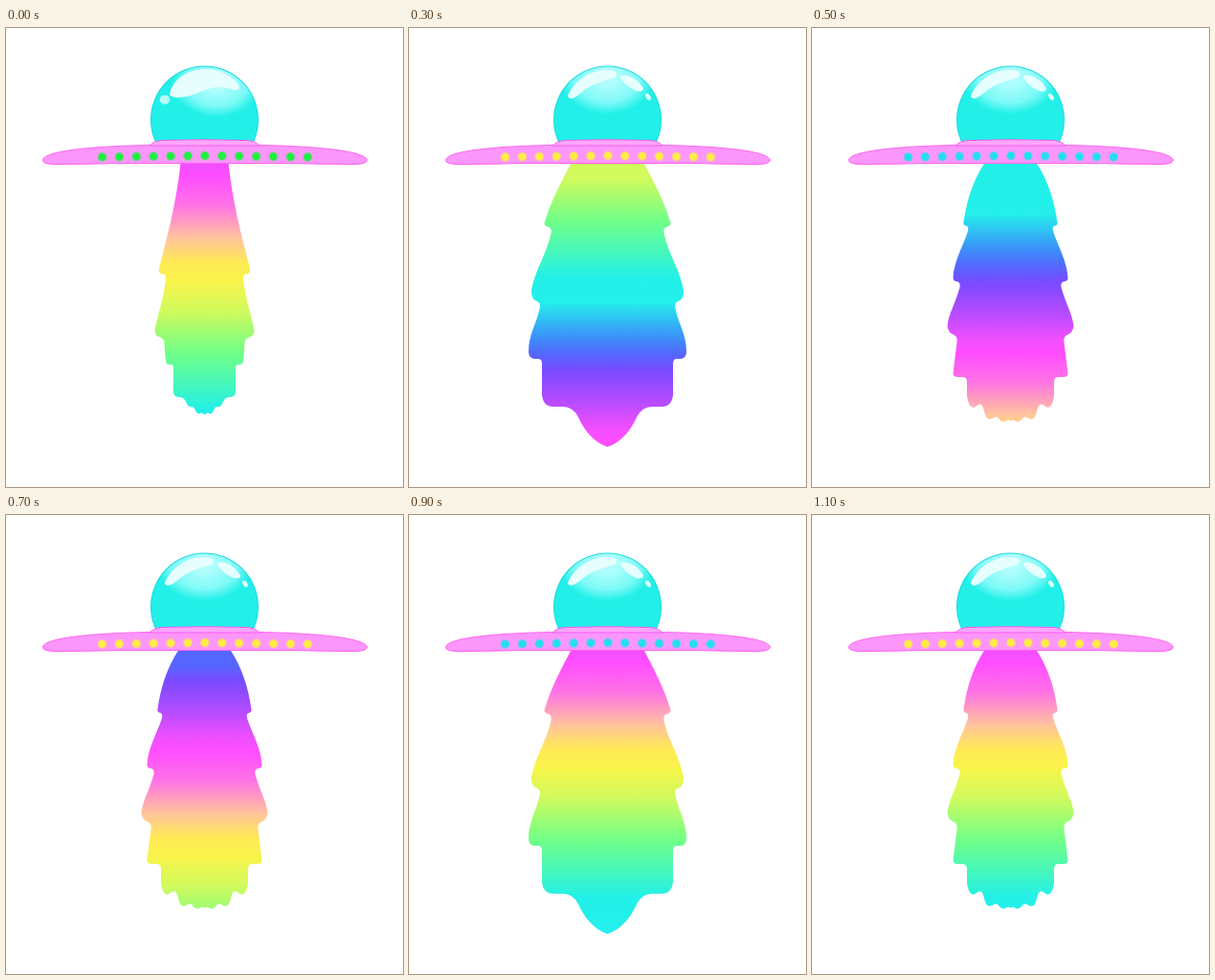
Write an HTML page with a canvas that moves like this. It is 415 px wide and 480 px high and loops after 1.2 s.

```html
<!DOCTYPE html>
<html>
<head>
<meta charset="utf-8">
<style>
html, body { margin: 0; height: 100%; overflow: hidden; background: #fff; }
canvas { display: block; }
</style>
</head>
<body>
<canvas id="stage" width="415" height="480"></canvas>
<script>
const ctx = document.getElementById('stage').getContext('2d');
const STEP = 100, STEPS = 12, MID = 207.5, CYCLE = 415;

// Right halves of the beam, measured from the centre line.
const narrow = new Path2D('M-.5 138H25V141C29 180 38 215 47 249Q49 257 45 257Q40 257 40.5 262C43 285 49 300 52 316Q52 322 47 323Q42 325 42 330Q41 347 40 350Q39 352 34 352Q32 353 32.5 358V381Q32 386 26 386Q21 386 19 392Q17 397 13 396Q11 396 9 401Q7 405 4 402.5Q2 402 1 404H-.5Z');
const medium = new Path2D('M-.5 138H20L23 141C34 156 39 172 43.5 188Q44 195 41 195Q38 196 40 202C47 221 57 236 63.5 252Q66 259 58 260Q55 261 55.5 266C59 287 69 302 74 321Q75 330 68 332Q61 334 62 343C63 357 69 369 71 382Q72 389 65 389H42Q37 389 33 394C28 402 23 412 14 413Q9 413 6 410Q3 407 0 408H-.5Z');
const wide = new Path2D('M-.5 138H36L38 141C49 162 60 183 66 204Q66 207 62 208Q58 209 59 215C64 237 76 254 79.5 274Q80 283 75 285Q70 287 70.5 291C73 307 83 321 82.5 339Q82 346 76 346H72Q68 346 68.5 353V384Q67 396 57 396H46Q37 396 31 406C25 420 14 434 0 438H-.5Z');
const tall = new Path2D('M-.5 138H25L27 141C39 159 46 181 49 203Q50 206 46 207Q43 208 45 214C51 231 59 244 60 261Q60 265 56 265Q52 266 53 271C57 287 65 299 66 312Q65 319 59 321Q55 323 56 329L60 361Q60 365 55 365H49Q45 366 45.5 372V385Q44 396 39 397Q36 396 34 394Q30 392 28 399Q26 409 22 409Q19 409 17 407Q14 405 11 410Q8 413 5 411Q2 409 0 411H-.5Z');
const beams = [narrow, tall, medium, wide, medium, tall];
const lamps = ['#1df03e', '#22dfee', '#cc70ff', '#ffec45'];

const rainbow = [
  [155, '#ff4dff'], [185, '#ff72e6'], [220, '#ffc49c'], [245, '#ffea55'],
  [265, '#f8f44a'], [295, '#d2fa5c'], [340, '#70ff88'], [400, '#22f0e8'],
  [425, '#24efec'], [462, '#3c90fa'], [480, '#5566ff'], [497, '#7b4aff'],
  [530, '#b84cff'], [555, '#ee4fff']
];

const hull = new Path2D('M38.5 138C40 128 95 123.500 150 122.500H265C320 123.500 375 128 377.500 138Q377 142.500 364 142.500Q330 142.500 298 141.500H118Q85 142.500 52 142.500Q38 142.500 38.500 138Z');
const collar = new Path2D('M150 123Q155 118 163 117.500Q207.500 116 252 117.500Q260 118 265 123Z');
const gloss = [
  new Path2D('M171 69C175 51 193 43 208 43C223 43 239 51 244 61Q244 67 236 64C222 59 212 63 200 68C189 73 173 75 171 69Z'),
  new Path2D('M166 71C173 54 191 43 210 44Q221 46 215 52C204 55 192 58 182 66Q171 76 167 73ZM221 52Q221 48 229 50Q239 53 245 63Q245 67 238 66Q226 61 221 52Z')
];

function disc(x, y, rx, ry, color, turn = 0) {
  ctx.fillStyle = color;
  ctx.beginPath();
  ctx.ellipse(x, y, rx, ry, turn, 0, 2 * Math.PI);
  ctx.fill();
}

function shape(path, fill, stroke) {
  ctx.fillStyle = fill;
  ctx.strokeStyle = stroke;
  ctx.fill(path);
  ctx.stroke(path);
}

function drawBeam(path, shift) {
  const top = 140, height = 300;
  const grad = ctx.createLinearGradient(0, top, 0, top + height);
  const stops = [-1, 0, 1, 2].flatMap(k =>
    rainbow.map(([y, color]) => [(y + k * CYCLE - shift - top) / height, color]));
  for (const [at, color] of stops) {
    if (at >= 0 && at <= 1) grad.addColorStop(at, color);
  }
  ctx.fillStyle = grad;
  for (const side of [1, -1]) {
    ctx.save();
    ctx.translate(MID, 0);
    ctx.scale(side, 1);
    ctx.fill(path);
    ctx.restore();
  }
}

function drawDome(phase) {
  ctx.save();
  ctx.beginPath();
  ctx.rect(145, 35, 125, 86);
  ctx.clip();
  disc(MID, 96, 56.5, 56.5, '#19d9df');
  disc(MID, 96, 55.5, 55.5, '#22f0e8');

  ctx.beginPath();
  ctx.arc(MID, 96, 55.5, 0, 2 * Math.PI);
  ctx.clip();
  const [x, y, r] = phase ? [207, 52, 38] : [220, 57, 36];
  ctx.translate(x, y);
  ctx.scale(1.3, 1);
  const glow = ctx.createRadialGradient(0, 0, 8, 0, 0, r);
  glow.addColorStop(0, 'rgba(190,255,255,.9)');
  glow.addColorStop(.6, 'rgba(175,255,255,.65)');
  glow.addColorStop(1, 'rgba(175,255,255,0)');
  disc(0, 0, r, r, glow);
  ctx.restore();

  ctx.fillStyle = '#e6fefe';
  ctx.fill(gloss[phase]);
  if (phase) disc(250, 72, 2.3, 3.8, '#e0fefd', -.6);
  else disc(166, 75, 5.3, 4.8, '#b5fbf8');
}

function drawSaucer(color) {
  ctx.lineWidth = 1;
  shape(hull, '#fb96fb', '#ff62ee');
  shape(collar, '#ffa6fa', '#f55cf0');
  for (let i = 0; i < 13; i++) {
    const x = 100.5 + i * 17.9, y = 133.5 + Math.abs(i - 6) * .25;
    const lamp = ctx.createRadialGradient(x, y, 0, x, y, 5.5);
    lamp.addColorStop(0, color);
    lamp.addColorStop(.6, color);
    lamp.addColorStop(1, color + '00');
    disc(x, y, 5.5, 5.5, lamp);
  }
}

function draw() {
  const step = Math.floor(performance.now() / STEP) % STEPS;
  ctx.clearRect(0, 0, 415, 480);
  // The rainbow climbs one full cycle in nine steps, then rests.
  drawBeam(beams[step % 6], Math.min(step, 9) * CYCLE / 9);
  drawDome(step % 2);
  drawSaucer(lamps[step % 4]);
  requestAnimationFrame(draw);
}
draw();
</script>
</body>
</html>
```
